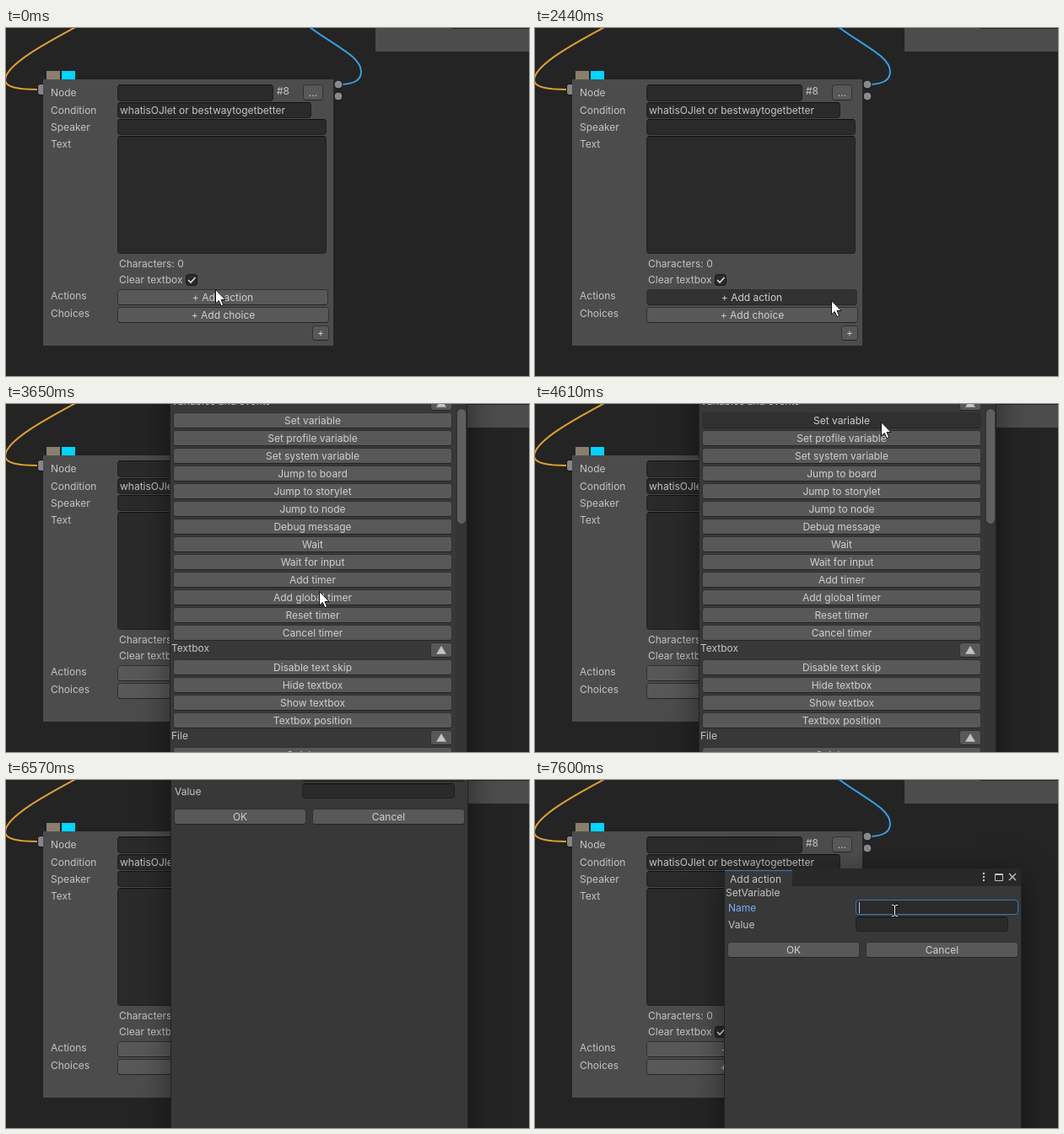
Recreate the animation shown at these times as an HTML page with a canvas. Size 620x413 px, loop 8000 ms.

```html
<!DOCTYPE html>
<html lang="en">
<head>
<meta charset="utf-8">
<style>
html, body { margin: 0; width: 100%; height: 100%; overflow: hidden; background: #242424; }
canvas { display: block; }
</style>
</head>
<body>
<canvas id="stage" width="620" height="413"></canvas>
<script>
const ctx = document.getElementById('stage').getContext('2d');
const LOOP = 8000;
const GRAB = { x: 169, y: 9 }; // pointer position inside the dragged window

// time, x, y; the pointer eases between neighbouring entries
const POINTER = [
  [0, 248, 310], [180, 254, 313], [300, 254, 313], [330, 255, 313],
  [700, 255, 313], [840, 350, 315], [1050, 350, 315], [1080, 351, 316],
  [1240, 351, 316], [1300, 351, 324], [2010, 351, 324], [2070, 351, 323],
  [3340, 351, 323], [4140, 410, 21], [5320, 410, 21], [5480, 364, -50],
  [6550, 364, -50], [6745, 394, 134], [6850, 394, 114], [7090, 426, 155],
  [7570, 426, 155], [7600, 426, 155]
];

const ACTIONS = ['Set variable', 'Set profile variable', 'Set system variable', 'Jump to board',
  'Jump to storylet', 'Jump to node', 'Debug message', 'Wait', 'Wait for input', 'Add timer',
  'Add global timer', 'Reset timer', 'Cancel timer'];
const TEXTBOX = ['Disable text skip', 'Hide textbox', 'Show textbox', 'Textbox position'];

function pointerAt(t) {
  const next = POINTER.findIndex(p => p[0] > t);
  if (next < 0) return { x: 426, y: 155 };
  const [t0, x0, y0] = POINTER[next - 1], [t1, x1, y1] = POINTER[next];
  const u = (t - t0) / (t1 - t0), k = u * u * (3 - 2 * u);
  return { x: Math.round(x0 + (x1 - x0) * k), y: Math.round(y0 + (y1 - y0) * k) };
}

function rect(x, y, w, h, color) {
  ctx.fillStyle = color;
  ctx.fillRect(x, y, w, h);
}

function text(s, x, y, color = '#c4c4c4', align = 'left') {
  ctx.font = '12px Inter, sans-serif';
  ctx.textAlign = align;
  ctx.fillStyle = color;
  ctx.fillText(s, x, y + 4);
}

function box(x, y, w, h, fill, border, radius = 3) {
  ctx.beginPath();
  ctx.roundRect(x + .5, y + .5, w - 1, h - 1, radius);
  ctx.fillStyle = fill;
  ctx.fill();
  ctx.strokeStyle = border;
  ctx.lineWidth = 1;
  ctx.stroke();
}

function field(x, y, w, h, focused) {
  box(x, y, w, h, '#2a2a2a', focused ? '#3a79bb' : '#1f1f1f');
  if (!focused) rect(x + 2, y, w - 4, 1, '#111');
}

function button(label, x, y, w, h, fill = '#585858') {
  box(x, y, w, h, fill, '#303030');
  rect(x + 2, y + h - 1, w - 4, 1, '#242424');
  text(label, x + w / 2, y + Math.round(h / 2), '#cfcfcf', 'center');
}

function path(d, stroke, width, fill) {
  const p = new Path2D(d);
  if (fill) { ctx.fillStyle = fill; ctx.fill(p); }
  ctx.strokeStyle = stroke;
  ctx.lineWidth = width;
  ctx.stroke(p);
}

function disc(x, y, r, fill, border) {
  ctx.beginPath();
  ctx.arc(x, y, r, 0, 7);
  ctx.fillStyle = fill;
  ctx.fill();
  if (border) { ctx.strokeStyle = border; ctx.lineWidth = 1; ctx.stroke(); }
}

function drawNode(t) {
  rect(0, 0, 620, 413, '#242424');
  rect(438, 0, 182, 28, '#4c4c4c');
  rect(528, 0, 92, 1, '#262626');
  path('M88 -4 C45 19 -1 44 -1 62 C-1 71 18 73 38 73', '#e0a030', 2);
  path('M360 -1 C391 22 421 34 421 52 C421 63 411 66 399 67', '#399fe0', 2);
  box(37, 66, 16, 14, '#858585', '#111', 3);
  rect(48, 51, 16, 10, '#8a7f6c');
  rect(66, 51, 16, 10, '#00d4ff');
  rect(44, 61, 344, 316, '#4c4c4c');
  disc(394, 67, 5, '#8a8a8a', '#111');
  disc(394, 81, 5, '#8a8a8a', '#111');

  [['Node', 77], ['Condition', 98], ['Speaker', 118], ['Text', 138], ['Actions', 318], ['Choices', 339]]
    .forEach(([s, y]) => text(s, 53, y));
  field(132, 67, 185, 20);
  text('#8', 321, 75);
  button('...', 352, 67, 24, 19);
  field(132, 88, 230, 19);
  text('whatisOJlet or bestwaytogetbetter', 135, 98);
  field(132, 108, 248, 19);
  field(132, 128, 248, 140);
  text('Characters: 0', 134, 280);
  text('Clear textbox', 134, 299);
  box(213, 292, 14, 14, '#2a2a2a', '#171717');
  path('M216 299 L219 302 L224.5 296', '#d8d8d8', 1.7);

  const fill = t >= 2350 && t < 2660 ? '#323232' : t >= 2660 && t < 2720 ? '#676767' : undefined;
  button('+ Add action', 132, 310, 250, 19, fill);
  button('+ Add choice', 132, 331, 251, 19);
  button('+', 363, 353, 20, 18);
}

function drawWindow(x, y) {
  ctx.save();
  ctx.shadowColor = 'rgba(0,0,0,.5)';
  ctx.shadowBlur = 36;
  ctx.shadowOffsetY = 10;
  rect(x, y, 351, 520, '#383838');
  ctx.restore();
  path(`M${x - .5} ${y} V413 M${x + 351.5} ${y} V413`, '#222', 1);
}

function drawSection(title, items, y, pressed) {
  text(title, 196, y);
  button('', 503, y - 7, 26, 18);
  path(`M510.5 ${y + 6.5} L516 ${y - 2.5} L521.5 ${y + 6.5} Z`, '#c4c4c4', .5, '#c4c4c4');
  items.forEach((s, i) =>
    button(s, 198, y + 13 + i * 21, 331, 19, pressed && i === 0 ? '#303030' : undefined));
}

function drawList(t) {
  drawWindow(195, -59);
  rect(533, 0, 13, 413, '#343434');
  box(535, 6, 10, 136, '#5f5f5f', '#5f5f5f', 5);
  drawSection('Variables and events', ACTIONS, -3, t >= 4610);
  drawSection('Textbox', TEXTBOX, 290);
  drawSection('File', ['Quick save'], 394);
}

function drawForm(x, y, focused) {
  drawWindow(x, y);
  ctx.save();
  ctx.translate(x, y);
  rect(0, 0, 351, 21, '#282828');
  rect(0, 2, 80, 19, '#383838');
  rect(0, 2, 80, 1, '#3a79bb');
  text('Add action', 6, 13);
  [6, 10, 14].forEach(dy => disc(307, dy, 1.2, '#c4c4c4'));
  path('M320.5 6.5 H329.5 V14.5 H320.5 Z M320 7.5 H330', '#c4c4c4', 1);
  path('M337 6 L345 14 M345 6 L337 14', '#c4c4c4', 1.4);
  text('SetVariable', 1, 29);
  text('Name', 4, 47, focused ? '#7baefa' : undefined);
  text('Value', 4, 67);
  field(155, 37, 193, 18, focused);
  field(155, 57, 181, 18);
  if (focused) rect(159, 40, 1, 13, '#c4c4c4');
  button('OK', 3, 87, 157, 19);
  button('Cancel', 167, 87, 181, 19);
  ctx.restore();
}

function drawPointer({ x, y }, beam) {
  ctx.save();
  ctx.translate(x, y);
  if (beam) {
    const shape = 'M-3 -6.5 H-1 L.5 -5.5 L2 -6.5 H4 M.5 -5.5 V5.5 M-3 6.5 H-1 L.5 5.5 L2 6.5 H4';
    path(shape, '#111', 3);
    path(shape, '#fff', 1);
  } else {
    path('M.5 .5 V17 L4.3 13.5 L7 19.7 L9.7 18.5 L7 12.5 H12 Z', '#111', 1, '#fff');
  }
  ctx.restore();
}

function draw(now) {
  const t = now % LOOP, p = pointerAt(t);
  drawNode(t);
  if (t >= 4760) {
    const grip = t < 6550 ? { x: 364, y: -50 } : t < 6850 ? p : { x: 394, y: 114 };
    drawForm(grip.x - GRAB.x, grip.y - GRAB.y, t >= 7270);
  } else if (t >= 2660) {
    drawList(t);
  }
  drawPointer(p, t >= 7030);
  requestAnimationFrame(draw);
}
requestAnimationFrame(draw);
</script>
</body>
</html>
```
